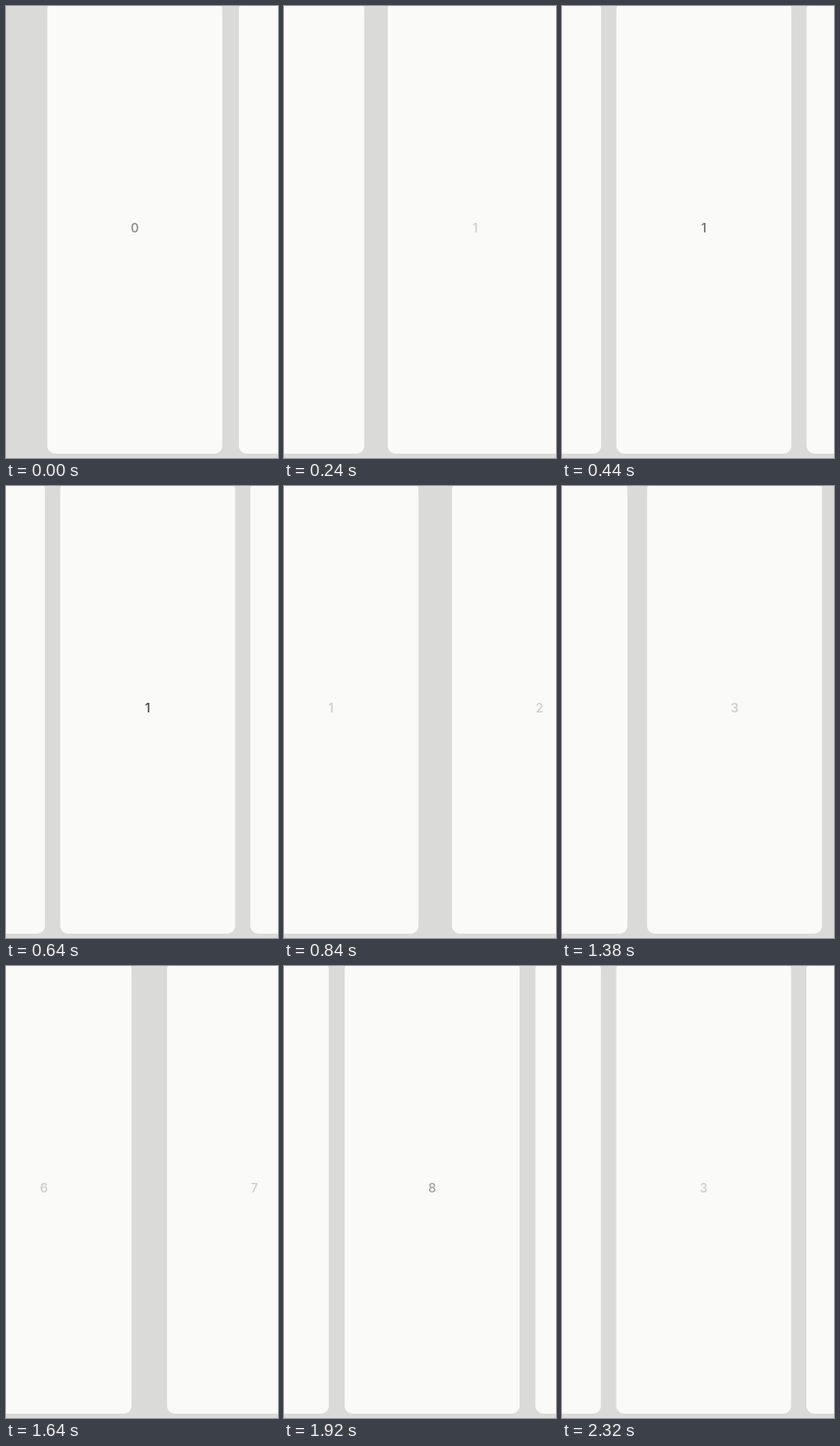
An HTML page for the animation above (2.65 s loop, 314 px wide and 521 px high).

```html
<!DOCTYPE html>
<html lang="en">
<head>
<meta charset="utf-8">
<title>Card pager</title>
<style>
  html, body { margin: 0; width: 100%; height: 100%; overflow: hidden; background: #dadad9; }
  svg { display: block; width: 314px; height: 521px; }
  rect { fill: #fafaf8; }
  text { font: 500 14.5px Inter, "Open Sans", sans-serif; text-anchor: middle; }
</style>
</head>
<body>
<svg id="stage" viewBox="0 0 314 521"></svg>
<script>
const NS = 'http://www.w3.org/2000/svg';
const LOOP = 2650;
const FRAME = 200 / 3; // the picture moves at 15 steps per second
const FIRST = 40;
const CENTER = 163.5;
const CARD = { width: 202, top: -5, height: 521, radius: 9 };
const PITCH = 219.6;
const SPREAD = 24; // extra gap halfway between two cards
const DARK = 64;
const LIGHT = 204;

const SWIPES = [
  { start: 25.4, duration: 429, from: 0, to: 1 },
  { start: 728, duration: 429, from: 1, to: 2 },
  { start: 1327.8, duration: 626, from: 2, to: 8 }
];
const JUMP = { start: 2320, page: 3 };

const stage = document.getElementById('stage');
const clamp = x => Math.min(1, Math.max(0, x));
const easeOut = u => 1 - (1 - u) ** 2;

function add(parent, tag, attrs = {}) {
  const el = document.createElementNS(NS, tag);
  for (const key in attrs) el.setAttribute(key, attrs[key]);
  return parent.appendChild(el);
}

// Four slots cover every card that can be in view
const slots = [-1, 0, 1, 2].map(offset => {
  const group = add(stage, 'g');
  add(group, 'rect', {
    x: -CARD.width / 2, y: CARD.top,
    width: CARD.width, height: CARD.height, rx: CARD.radius
  });
  const label = add(group, 'text', { y: 260.8 });
  return { offset, group, label };
});

function hold(time) {
  const steps = Math.floor((time - FIRST + 1) / FRAME);
  return FIRST + Math.max(0, steps) * FRAME;
}

// Page position, and how far the numbers have faded (0 at rest, 1 moving)
function stateAt(time) {
  if (time >= JUMP.start) return { page: JUMP.page, fade: 1 };
  const now = hold(time);
  const { start, duration, from, to } = SWIPES.findLast(s => s.start <= now);
  const u = clamp((now - start) / duration);
  return {
    page: from + (to - from) * easeOut(u),
    fade: clamp(Math.min(u / 0.07, (1 - u) / 0.11))
  };
}

function pitchAt(page) {
  const between = 2 * Math.abs(page - Math.round(page));
  return PITCH + SPREAD * between ** 1.35;
}

function draw(time) {
  const { page, fade } = stateAt(time);
  const pitch = pitchAt(page);
  const grey = Math.round(DARK + (LIGHT - DARK) * fade);
  for (const { offset, group, label } of slots) {
    const index = Math.floor(page) + offset;
    const x = CENTER + (index - page) * pitch;
    group.setAttribute('transform', `translate(${x.toFixed(2)} 0)`);
    group.setAttribute('visibility', index < 0 ? 'hidden' : 'visible');
    label.textContent = index;
    label.setAttribute('fill', `rgb(${grey},${grey},${grey})`);
  }
}

const start = performance.now();
function tick() {
  draw((performance.now() - start) % LOOP);
  requestAnimationFrame(tick);
}
tick();
</script>
</body>
</html>
```
